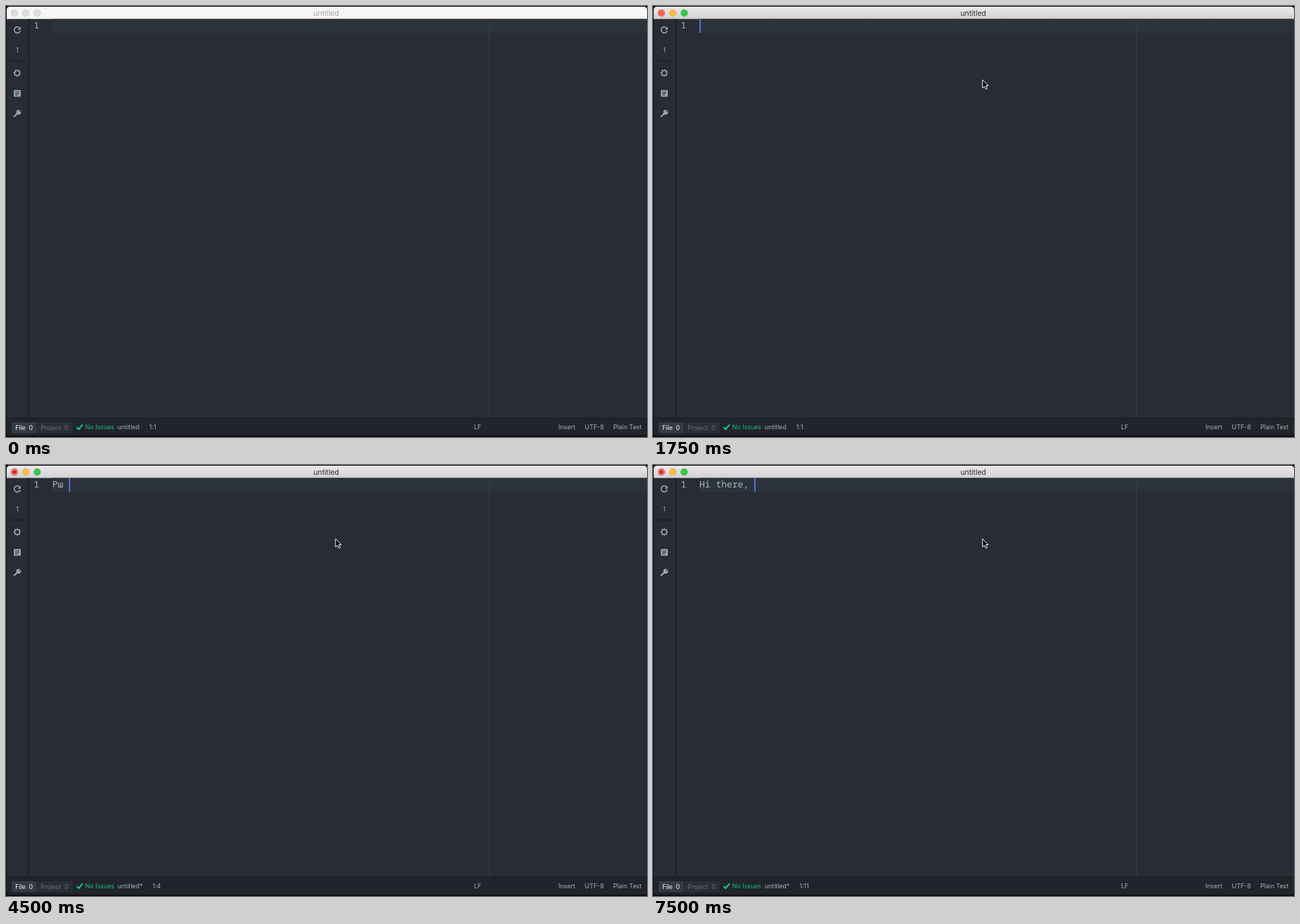
These frames come from a looping animation (912 by 614 pixels, 8 s). An HTML page:

```html
<!DOCTYPE html>
<html lang="en">
<head>
<meta charset="utf-8">
<title>Editor typing</title>
<style>
  html, body { margin: 0; width: 100%; height: 100%; overflow: hidden; background: #0d0e11; }
  svg { display: block; width: 100vw; height: 100vh; }
  text { font-family: Inter, Roboto, sans-serif; font-size: 8.85px; fill: #a7aebb; white-space: pre; }
  .code { font: 13px "Noto Sans Mono", "DejaVu Sans Mono", monospace; fill: #abb2bf; }
  .title { font-size: 10.4px; text-anchor: middle; fill: #2e2c2e; }
  .tab { font-weight: 500; word-spacing: 2px; }
  .icon { fill: none; stroke: #a0a7b4; stroke-width: 1.5; }
  .lights circle { stroke-width: .6; stroke: #0002; }
  .inactive .title { fill: #a5a5a5; }
  .inactive .bar { fill: #f6f6f6; }
  .inactive .lights circle { fill: #dddddd; }
</style>
</head>
<body>
<svg id="stage" class="inactive" viewBox="0 0 912 614">
  <defs>
    <linearGradient id="chrome" x2="0" y2="1">
      <stop stop-color="#ebe9eb"/>
      <stop offset="1" stop-color="#d2d0d2"/>
    </linearGradient>
    <clipPath id="window"><rect x="1" y="1" width="911" height="611" rx="4.5"/></clipPath>
  </defs>

  <g clip-path="url(#window)">
    <rect width="912" height="614" fill="#282c34"/>
    <rect class="bar" x="1" y="1" width="911" height="17.5" fill="url(#chrome)"/>
    <rect x="66" y="18.5" width="846" height="20" fill="#2c333b"/>
    <rect x="687.4" y="18.5" width="1" height="568.5" fill="#3c4149"/>
    <rect x="31.6" y="18.5" width="1.4" height="568.5" fill="#191c21"/>
    <rect x="1" y="587" width="911" height="26" fill="#21252b"/>
    <rect x="1" y="586.6" width="911" height="1.2" fill="#191c21"/>
  </g>

  <g class="lights">
    <circle cx="12" cy="10" r="5" fill="#fc605b"/>
    <circle cx="28.2" cy="10" r="5" fill="#fdbc40"/>
    <circle cx="44.4" cy="10" r="5" fill="#33c748"/>
  </g>
  <circle id="dirtyDot" cx="12" cy="10" r="1.7" fill="#6e0d0a"/>
  <text class="title" x="455.7" y="13.6">untitled</text>

  <!-- Tool bar -->
  <g class="icon">
    <path d="M19.2 31.2A4.3 4.3 0 1 0 20.2 35.2"/>
    <path d="M20.8 29.5V33.8H16.6Z" fill="#a0a7b4" stroke="none"/>
    <path d="M5 78.3H28" stroke="#1a1d22" stroke-width="1.2"/>
    <circle cx="16" cy="95.5" r="3.5"/>
    <circle cx="16" cy="95.5" r="4.6" stroke-width="1.5" stroke-dasharray="1.6 2.013" stroke-dashoffset=".8"/>
    <rect x="11.2" y="119.8" width="9.8" height="9.4" rx="1" fill="#a0a7b4" stroke="none"/>
    <path d="M13 122.3H19M13 124.6H19M13 126.9H17.2" stroke="#282c34" stroke-width="1"/>
    <path d="M11.7 157.3L16.4 153" stroke-width="2.2" stroke-linecap="round"/>
    <circle cx="18" cy="151.4" r="3.3" fill="#a0a7b4" stroke="none"/>
    <path d="M18.4 151L20.3 149.2" stroke="#282c34" stroke-width="1.2"/>
  </g>
  <text x="16" y="66.2" text-anchor="middle">1</text>

  <!-- Editor -->
  <text class="code" x="39.5" y="32.4">1</text>
  <text class="code" id="code" x="66" y="32.4"></text>
  <rect id="caret" y="18.5" width="1.6" height="19.5" fill="#528bff"/>

  <!-- Status bar -->
  <rect x="8" y="593" width="35.5" height="15.5" rx="1.5" fill="#353b45"/>
  <rect x="44" y="593" width="51" height="15.5" rx="1.5" fill="#2a2f37"/>
  <text class="tab" x="13.2" y="604.3" style="fill:#d7dae0">File 0</text>
  <text class="tab" x="49.3" y="604.3" style="fill:#686e79;font-weight:400">Project 0</text>
  <path d="M100.6 600.2L103.4 603L109 596.4" fill="none" stroke="#1fc486" stroke-width="2.2"/>
  <text x="112.8" y="602.9" style="fill:#1fb981">No Issues</text>
  <text id="file" x="158.8" y="602.9"></text>
  <text id="position" y="602.9"></text>
  <text x="666" y="602.9">LF</text>
  <text x="786" y="602.9">Insert</text>
  <text x="823.6" y="602.9">UTF-8</text>
  <text x="864" y="602.9">Plain Text</text>

  <path id="pointer" d="M0 0V11.6L2.7 9.1L4.6 13.4L6.6 12.5L4.8 8.3H8.2Z" fill="#000" stroke="#fff" stroke-width="1"/>
</svg>

<script>
  const LOOP = 8000, COLUMN = 7.8;
  const byId = id => document.getElementById(id);
  const [stage, dot, code, caret, file, position, pointer] =
    ["stage", "dirtyDot", "code", "caret", "file", "position", "pointer"].map(byId);

  // [time, text, modified, caret visible]
  const steps = [
    [0, "", false, false],
    [1750, "", false, true],
    [2000, "", false, false],
    [2500, "Р", false, true],
    [2750, "Рш", true, true],
    [3000, "Рш ", true, true],
    [3250, "Рш е", true, true],
    [3500, "Рш ер", true, true],
    [3750, "Рш еру", true, true],
    [4000, "Рш ерук", true, true],
    [4500, "Рш ", true, true],
    [4750, "", true, true],
    [5250, "", false, false],
    [5750, "H", false, true],
    [6000, "Hi", false, true],
    [6250, "Hi t", false, true],
    [6500, "Hi the", false, true],
    [6750, "Hi ther", false, true],
    [7000, "Hi there", false, true],
    [7250, "Hi there,", true, true],
    [7500, "Hi there, ", true, true]
  ];

  const show = (node, on) => node.setAttribute("visibility", on ? "visible" : "hidden");

  function render(time) {
    const [, text, modified, caretOn] = steps.findLast(step => step[0] <= time);
    code.textContent = text;
    caret.setAttribute("x", 66.2 + COLUMN * text.length);
    show(caret, caretOn);
    show(dot, modified);
    file.textContent = modified ? "untitled*" : "untitled";
    position.textContent = `1:${text.length + 1}`;
    position.setAttribute("x", modified ? 208.4 : 203.8);

    stage.classList.toggle("inactive", time < 750);
    show(pointer, time >= 500);
    pointer.setAttribute("transform", time < 750 ? "translate(482.8 71.4)" : "translate(468.9 105.2)");
  }

  const start = performance.now();
  function tick() {
    render((performance.now() - start) % LOOP);
    requestAnimationFrame(tick);
  }
  tick();
</script>
</body>
</html>
```
